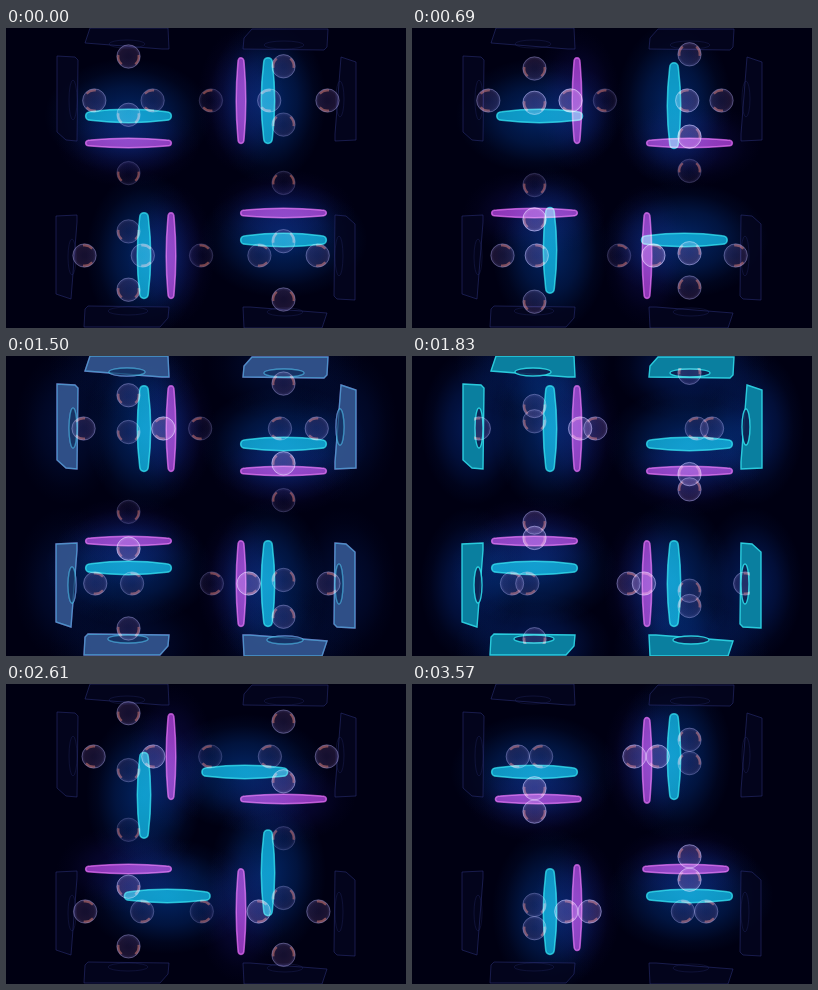
Animation, 400 px wide and 300 px high, one loop 3600 ms. Source, as an HTML page with a canvas:

```html
<!DOCTYPE html>
<html lang="en">
<head>
<meta charset="utf-8">
<title>Neon rings</title>
<style>
  html, body { margin: 0; width: 100%; height: 100%; overflow: hidden; background: #000012; }
  canvas { display: block; width: 400px; height: 300px; }
</style>
</head>
<body>
<canvas id="stage" width="400" height="300"></canvas>
<script>
const ctx = document.getElementById('stage').getContext('2d');
const LOOP = 3600;
const HOP = 155; // distance between neighbouring cells
const CYAN = { fill: '12,140,172', edge: '45,215,230' };
const PURPLE = { fill: '140,50,170', edge: '215,90,235' };

// Offset of the alternating beads from even spacing: [time, pixels]
const BEAD_KEYS = [[0, 0], [690, 12], [1170, 0], [1830, 21.5], [2250, 17.5],
                   [2940, -14], [3570, -17.5], [3600, 0]];

const TOP_BOX = [[79, 15], [84, 0], [162, 0], [163, 21], [156, 21]];
const LEFT_BOX = [[51, 28], [69, 29], [72, 32], [71, 113], [60, 112], [51, 104]];

const clamp = v => Math.min(1, Math.max(0, v));
const ease = u => (1 - Math.cos(Math.PI * clamp(u))) / 2;
const ramp = (t, start) => ease((t - start) / 600);
const bump = (t, middle, half) => {
  const d = Math.abs(t - middle) / half;
  return d < 1 ? Math.min(1, 2 * Math.cos(d * Math.PI / 2) ** 2) : 0;
};

function beadOffset(t) {
  const i = BEAD_KEYS.findIndex(key => key[0] > t);
  const [t0, a] = BEAD_KEYS[i - 1];
  const [t1, b] = BEAD_KEYS[i];
  return a + (b - a) * ease((t - t0) / (t1 - t0));
}

// The whole picture is one arm repeated at four quarter turns
function eachQuarter(draw) {
  for (let k = 0; k < 4; k++) {
    ctx.save();
    ctx.translate(200, 150);
    ctx.rotate(k * Math.PI / 2);
    ctx.translate(-200, -150);
    draw();
    ctx.restore();
  }
}

function glow(x, y, rx, ry, color, alpha) {
  ctx.save();
  ctx.translate(x, y);
  ctx.scale(rx, ry);
  const g = ctx.createRadialGradient(0, 0, 0, 0, 0, 1);
  g.addColorStop(0, `rgba(${color},${alpha})`);
  g.addColorStop(0.5, `rgba(${color},${alpha * 0.55})`);
  g.addColorStop(0.8, `rgba(${color},${alpha * 0.14})`);
  g.addColorStop(1, `rgba(${color},0)`);
  ctx.fillStyle = g;
  ctx.fillRect(-1, -1, 2, 2);
  ctx.restore();
}

function bar(x, y, thick, tone) {
  const w = 43, h = thick / 2, e = h * 0.62;
  ctx.beginPath();
  ctx.moveTo(x - w + 5, y - e);
  ctx.quadraticCurveTo(x, y - h * 1.3, x + w - 5, y - e);
  ctx.bezierCurveTo(x + w + 1.5, y - e, x + w + 1.5, y + e, x + w - 5, y + e);
  ctx.quadraticCurveTo(x, y + h * 1.3, x - w + 5, y + e);
  ctx.bezierCurveTo(x - w - 1.5, y + e, x - w - 1.5, y - e, x - w + 5, y - e);
  ctx.fillStyle = `rgb(${tone.fill})`;
  ctx.strokeStyle = `rgba(${tone.edge},0.75)`;
  ctx.lineWidth = 1.5;
  ctx.fill();
  ctx.stroke();
}

function bead(x, y, light) {
  const r = 11.7;
  const g = ctx.createRadialGradient(x, y, 2, x, y, r);
  g.addColorStop(0, `rgba(95,70,140,${0.05 + 0.5 * light})`);
  g.addColorStop(0.7, `rgba(95,65,115,${0.12 + 0.5 * light})`);
  g.addColorStop(1, `rgba(110,95,155,${0.25 + 0.5 * light})`);
  ctx.beginPath();
  ctx.arc(x, y, r, 0, 2 * Math.PI);
  ctx.fillStyle = g;
  ctx.fill();
  ctx.lineWidth = 1;
  ctx.strokeStyle = `rgba(145,140,205,${0.2 + 0.6 * light})`;
  ctx.stroke();

  ctx.lineWidth = 2.2;
  ctx.strokeStyle = 'rgba(215,110,70,0.5)';
  for (const angle of [0.35, Math.PI - 0.35]) {
    ctx.beginPath();
    ctx.arc(x, y, r - 1.5, angle - 0.5, angle + 0.5);
    ctx.stroke();
  }
}

// Bars light the beads beside them; a bead inside a bar stays dark
function beadLight(y, purple, cyan) {
  const near = (barY, level) => {
    const d = Math.abs(y - barY);
    return level * clamp(1.3 - d / 22) * clamp(d / 4);
  };
  const outer = 0.35 * clamp(Math.abs(y - 145) / 110);
  return Math.max(outer,
    near(115, 1 - purple), near(88, 1 - cyan),
    near(185, purple), near(212, cyan));
}

function outline(points) {
  ctx.beginPath();
  points.forEach(([x, y]) => ctx.lineTo(x, y));
  ctx.closePath();
}

function box(points, hole, purple, cyan) {
  outline(points);
  ctx.fillStyle = 'rgba(4,5,30,0.8)';
  ctx.fill();
  ctx.lineWidth = 1;
  ctx.strokeStyle = 'rgba(45,50,120,0.55)';
  ctx.stroke();
  ctx.beginPath();
  ctx.ellipse(...hole, 0, 0, 2 * Math.PI);
  ctx.strokeStyle = 'rgba(45,50,120,0.3)';
  ctx.stroke();

  for (const [tone, level] of [[PURPLE, purple], [CYAN, cyan]]) {
    if (level < 0.01) continue;
    outline(points);
    ctx.fillStyle = `rgba(${tone.fill},${0.9 * level})`;
    ctx.strokeStyle = `rgba(${tone.edge},${0.9 * level})`;
    ctx.lineWidth = 1.4;
    ctx.fill();
    ctx.stroke();
    ctx.beginPath();
    ctx.ellipse(...hole, 0, 0, 2 * Math.PI);
    ctx.fillStyle = `rgba(12,14,65,${0.8 * level})`;
    ctx.fill();
    ctx.stroke();
  }
}

function render(t) {
  const purple = t < 1800 ? ramp(t, 20) : 1 - ramp(t, 3030);
  const cyan = t < 1800 ? ramp(t, 620) : 1 - ramp(t, 2410);
  const boxPurple = bump(t, 1190, 490);
  const boxCyan = bump(t, 1800, 450);
  const boxLight = Math.max(0.6 * boxPurple, boxCyan);
  const shift = beadOffset(t);
  const purpleX = 122.5 + HOP * purple;
  const cyanX = 122.5 + HOP * cyan;

  ctx.globalCompositeOperation = 'source-over';
  ctx.fillStyle = '#000012';
  ctx.fillRect(0, 0, 400, 300);

  ctx.globalCompositeOperation = 'screen';
  eachQuarter(() => {
    glow(cyanX, 88, 84, 58, '4,58,140', 0.62);
    glow(purpleX, 115, 72, 44, '22,22,105', 0.42);
    if (boxLight > 0) {
      glow(121, 10, 78, 52, '6,45,125', 0.6 * boxLight);
      glow(61, 71, 52, 78, '6,45,125', 0.6 * boxLight);
    }
  });

  ctx.globalCompositeOperation = 'source-over';
  eachQuarter(() => {
    box(TOP_BOX, [121, 16, 18, 4], boxPurple, boxCyan);
    box(LEFT_BOX, [67, 72, 4, 20], boxPurple, boxCyan);
  });

  // Beads come and go through the holes in the boxes
  ctx.globalCompositeOperation = 'screen';
  eachQuarter(() => {
    ctx.beginPath();
    ctx.rect(100, 14, 45, 274);
    ctx.clip();
    for (let i = 0; i < 5; i++) {
      const y = 28.5 + 58.3 * i + (i % 2 ? -shift : shift);
      ctx.globalAlpha = clamp((y - 11) / 4);
      bead(122.5, y, beadLight(y, purple, cyan));
    }
  });

  eachQuarter(() => {
    bar(cyanX, 88, 14, CYAN);
    bar(purpleX, 115, 10, PURPLE);
  });
}

const begin = performance.now();
function frame() {
  const t = (performance.now() - begin) % LOOP;
  render(Math.floor(t / 30) * 30);
  requestAnimationFrame(frame);
}
frame();
</script>
</body>
</html>
```
